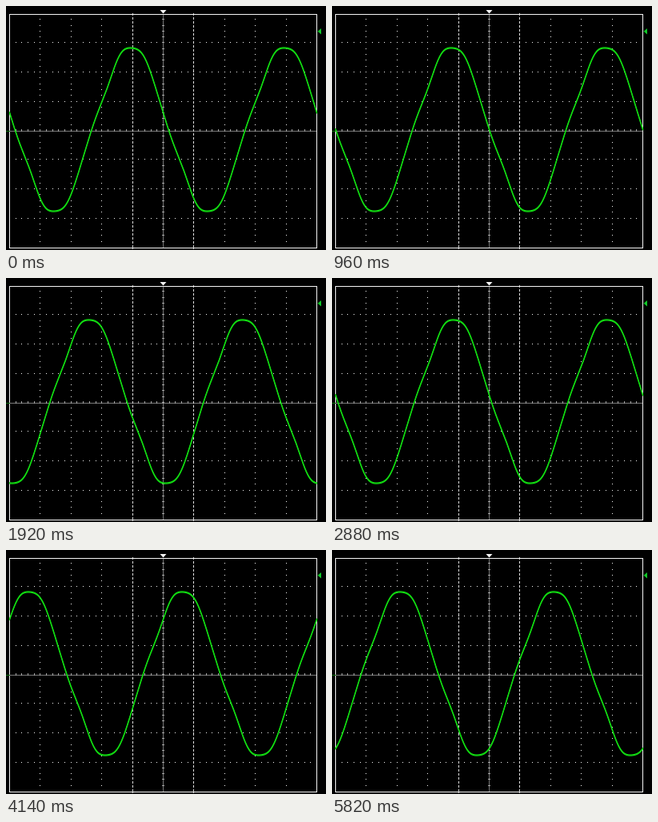
These frames come from a looping animation (400x305 px, 5880 ms). A matplotlib script:

```python
import numpy as np
import matplotlib.pyplot as plt
from matplotlib.animation import FuncAnimation

W, H, DPI = 400, 305, 80
PX = 72 / DPI
LEFT, TOP, RIGHT, BOTTOM = 4, 10, 388, 302
MID_X, MID_Y = 196, 156
DIV_X, DIV_Y = 38.4, 36.5
SLOTS, STEP_MS = 98, 60
PERIOD = 192
WHITE, GREY, TICK, GREEN = "#f4f4f4", "#787878", "#a8a8a8", "#12e012"

fig = plt.figure(figsize=(W / DPI, H / DPI), dpi=DPI, facecolor="black")
ax = fig.add_axes([0, 0, 1, 1])
ax.set(xlim=(0, W), ylim=(H, 0))
ax.axis("off")


def line(xs, ys, color):
    """One-pixel line; whole coordinates snap to that pixel."""
    ax.plot(xs, ys, color=color, lw=PX, antialiased=False, snap=True,
            solid_capstyle="butt", zorder=1)


def dots(xs, ys, color=WHITE):
    xs, ys = np.broadcast_arrays(xs, ys)
    ax.plot(np.round(xs) + 0.1, np.round(ys) + 0.1, ",", color=color, zorder=2)


# Graticule: dotted divisions, ticked centre axes, frame
fine_x = MID_X + np.arange(-24, 25) * DIV_X / 5
fine_y = MID_Y + np.arange(-19, 20) * DIV_Y / 5
for k in range(-4, 5):
    if k and abs(k) < 4:
        dots(fine_x, MID_Y + k * DIV_Y)
    if abs(k) > 1:
        dots(MID_X + k * DIV_X, fine_y)

line([LEFT, RIGHT], [MID_Y, MID_Y], GREY)
line([MID_X, MID_X], [TOP, BOTTOM], GREY)
for d in (-1, 0, 1):
    dots(fine_x, MID_Y + d, TICK)
    dots(MID_X + d, fine_y, TICK)

# Time cursors
rows = np.arange(TOP, H)
for x in (158, 234):
    dots(x, rows[(rows % 5 < 3) | (rows > BOTTOM)], "#dcdcdc")

line([LEFT, RIGHT, RIGHT, LEFT, LEFT], [TOP, TOP, BOTTOM, BOTTOM, TOP], WHITE)

# Trigger position, trigger level and ground markers
ax.fill([192.5, 200.5, 196.5], [5, 5, 9.5], color=WHITE, lw=0)
ax.fill([394, 394, 389.5], [28, 35.5, 31.7], color="#10c828", lw=0)
line([0, LEFT], [MID_Y, MID_Y], "#0a6a0a")


def wave(x):
    """Height at x pixels after the falling zero crossing."""
    p = np.pi * (1 + 2 * x / PERIOD)
    v = (np.sin(p - 0.008) + 0.032 * np.cos(3 * p + 0.93)
         + 0.022 * np.cos(5 * p + 0.82) + 0.009 * np.sin(7 * p))
    return 154 - 102 * v


# The free-running sweep drifts right and now and then skips a refresh
HOLDS = range(21, SLOTS, 14)
KEYS = [(0, 11.5), (16, 197), (32, 343.5), (48, 583.5),
        (69, 844), (84, 1011), (97, 1093)]


def drift(i):
    return np.interp(i - (i in HOLDS), *zip(*KEYS))


xs = np.arange(LEFT, RIGHT + 1)
traces = [ax.plot([], [], color=GREEN, lw=1.25 * PX, zorder=3)[0]
          for _ in range(2)]


def draw(i):
    ys = wave(xs - drift(i))
    for trace, dy in zip(traces, (0, 1)):
        trace.set_data(xs + 0.5, ys + dy)
    return traces


anim = FuncAnimation(fig, draw, frames=SLOTS, interval=STEP_MS,
                     repeat=True, repeat_delay=0)
plt.show()
```
